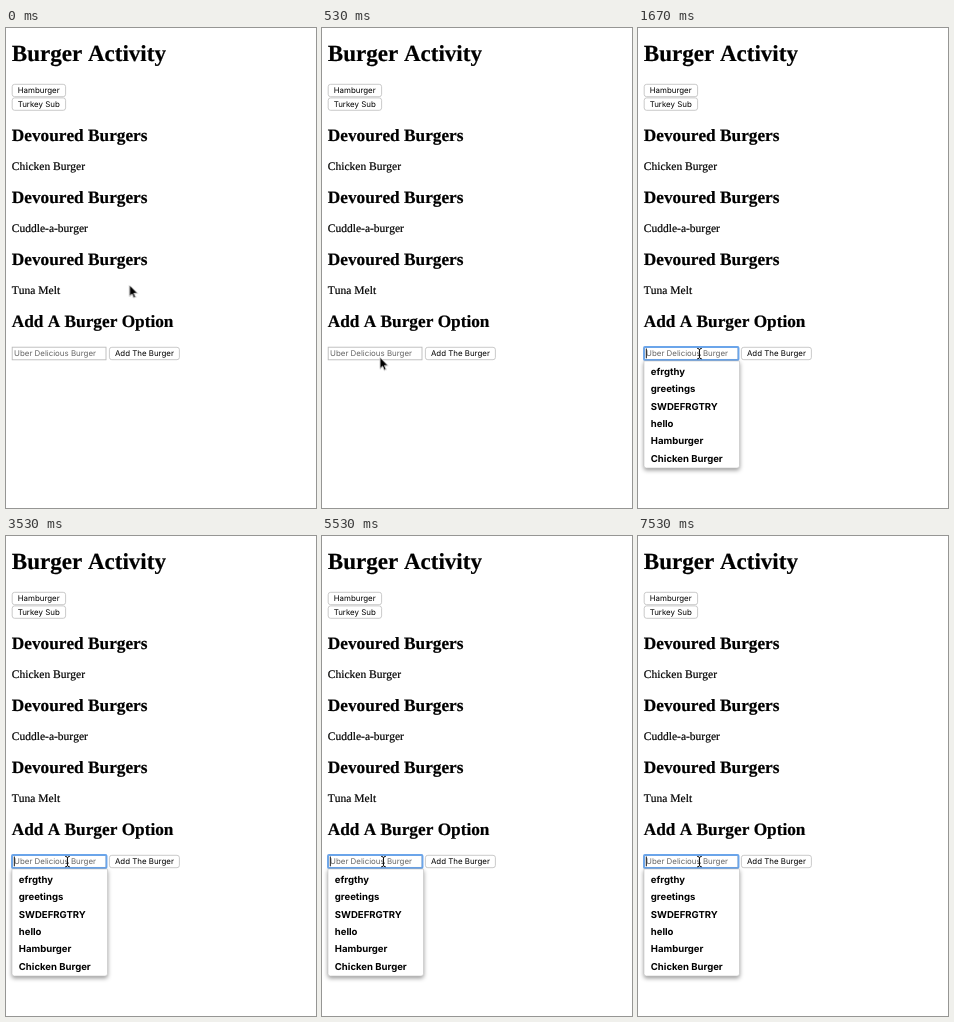
Recreate the animation shown at these times as an HTML page. Size 310 px wide and 480 px high, loop 8000 ms.

```html
<!DOCTYPE html>
<html lang="en">
<head>
<meta charset="utf-8">
<title>Burger Activity</title>
<style>
  html, body { margin: 0; width: 100%; height: 100%; overflow: hidden; background: #fff; }
  svg { display: block; width: 310px; height: 480px; text-rendering: geometricPrecision; }
  .h1, .h2, .p { font-family: "Liberation Serif", serif; font-kerning: none; stroke: #000; stroke-width: .2; }
  .h1 { font-size: 23.04px; font-weight: 700; }
  .h2 { font-size: 17.28px; font-weight: 700; }
  .p { font-size: 11.52px; }
  .ui, .item { font-family: Inter, sans-serif; font-size: 7.9px; }
  .item { font-size: 9.55px; font-weight: 700; }
  .hint { fill: #666; }
  .button { fill: #fff; stroke: #bdbdbd; stroke-width: .8; }
  .field { fill: #fff; stroke: #bbb; stroke-width: .9; }
  .ring { fill: none; stroke: #6ba5ea; stroke-width: 1.9; }
  .menu { fill: #fff; stroke: #c4c4c4; stroke-width: .6; filter: drop-shadow(0 2px 2px rgba(0, 0, 0, .4)); }
  .beam, .caret { fill: none; stroke: #111; stroke-width: 1; }
  .arrow { fill: #000; stroke: #fff; stroke-width: .8; filter: drop-shadow(0 .7px .6px rgba(0, 0, 0, .4)); }
</style>
</head>
<body>
<svg viewBox="0 0 310 480">
  <g id="page"></g>
  <g id="focus">
    <rect class="ring" x="6" y="319" width="94.5" height="13" rx="1"/>
    <path class="menu" d="M6 333H101.5V437.5Q101.5 440 99 440H8.5Q6 440 6 437.5Z"/>
    <g id="items"></g>
  </g>
  <path id="caret" class="caret" d="M8.3 320.5V330.3"/>
  <path id="beam" class="beam" d="M59.2 320.4Q61.5 320.4 61.5 322V329.2Q61.5 330.8 59.2 330.8M63.8 320.4Q61.5 320.4 61.5 322M61.5 329.2Q61.5 330.8 63.8 330.8M60.3 327.2H62.7"/>
  <g id="pointer"><path class="arrow" d="M0 0V11.4L2.6 9L4.3 13L6.2 12.2L4.5 8.3H8Z"/></g>
</svg>
<script>
const LOOP = 8000;
const byId = id => document.getElementById(id);

function add(parent, tag, attrs, content = '') {
  const el = document.createElementNS('http://www.w3.org/2000/svg', tag);
  for (const name in attrs) el.setAttribute(name, attrs[name]);
  el.textContent = content;
  parent.append(el);
}

const page = byId('page');
const write = (cls, x, y, content, parent = page) =>
  add(parent, 'text', { class: cls, x, y }, content);
const box = (cls, x, y, width, height, rx) =>
  add(page, 'rect', { class: cls, x, y, width, height, rx });

function button(x, y, width, label) {
  box('button', x, y, width, 12.4, 2.4);
  write('ui', x + 5.5, y + 9.1, label);
}

write('h1', 5.8, 33, 'Burger Activity');
button(6.2, 56.3, 53.4, 'Hamburger');
button(6.2, 69.9, 53.4, 'Turkey Sub');

['Chicken Burger', 'Cuddle-a-burger', 'Tuna Melt'].forEach((name, i) => {
  write('h2', 5.8, 112.9 + i * 62.1, 'Devoured Burgers');
  write('p', 5.8, 142 + i * 62, name);
});

write('h2', 5.8, 299, 'Add A Burger Option');
box('field', 6.2, 319.2, 93.8, 12.6, 0);
write('ui hint', 8.1, 328.4, 'Uber Delicious Burger');
button(103.4, 319.3, 70, 'Add The Burger');

['efrgthy', 'greetings', 'SWDEFRGTRY', 'hello', 'Hamburger', 'Chicken Burger']
  .forEach((name, i) => write('item', 12.8, 346.8 + i * 17.4, name, byId('items')));

// Each step is [time, value]; the value holds until the next step.
function hold(id, property, steps) {
  const last = steps[steps.length - 1][1];
  const frames = [...steps, [LOOP, last]].map(([time, value]) =>
    ({ offset: time / LOOP, [property]: value, easing: 'steps(1, end)' }));
  byId(id).animate(frames, { duration: LOOP, iterations: Infinity });
}

const pointerPath = [
  [0, 123.5, 257], [70, 121, 259.5], [130, 114, 267], [200, 103, 279],
  [270, 91, 292], [330, 79, 305], [400, 68, 317], [470, 60.5, 326],
  [530, 58, 329.3], [600, 59, 327], [730, 60.5, 324]
];
hold('pointer', 'transform', pointerPath.map(([t, x, y]) => [t, `translate(${x}px, ${y}px)`]));
hold('pointer', 'opacity', [[0, 1], [930, 0]]);
hold('beam', 'opacity', [[0, 0], [930, 1]]);
hold('focus', 'opacity', [[0, 0], [1670, 1]]);

const blinks = [1670, 2070, 2530, 3070, 3530, 4070, 4530, 5070, 5530, 6070, 6530, 7070, 7530];
hold('caret', 'opacity', [[0, 0], ...blinks.map((t, i) => [t, 1 - i % 2])]);
</script>
</body>
</html>
```
